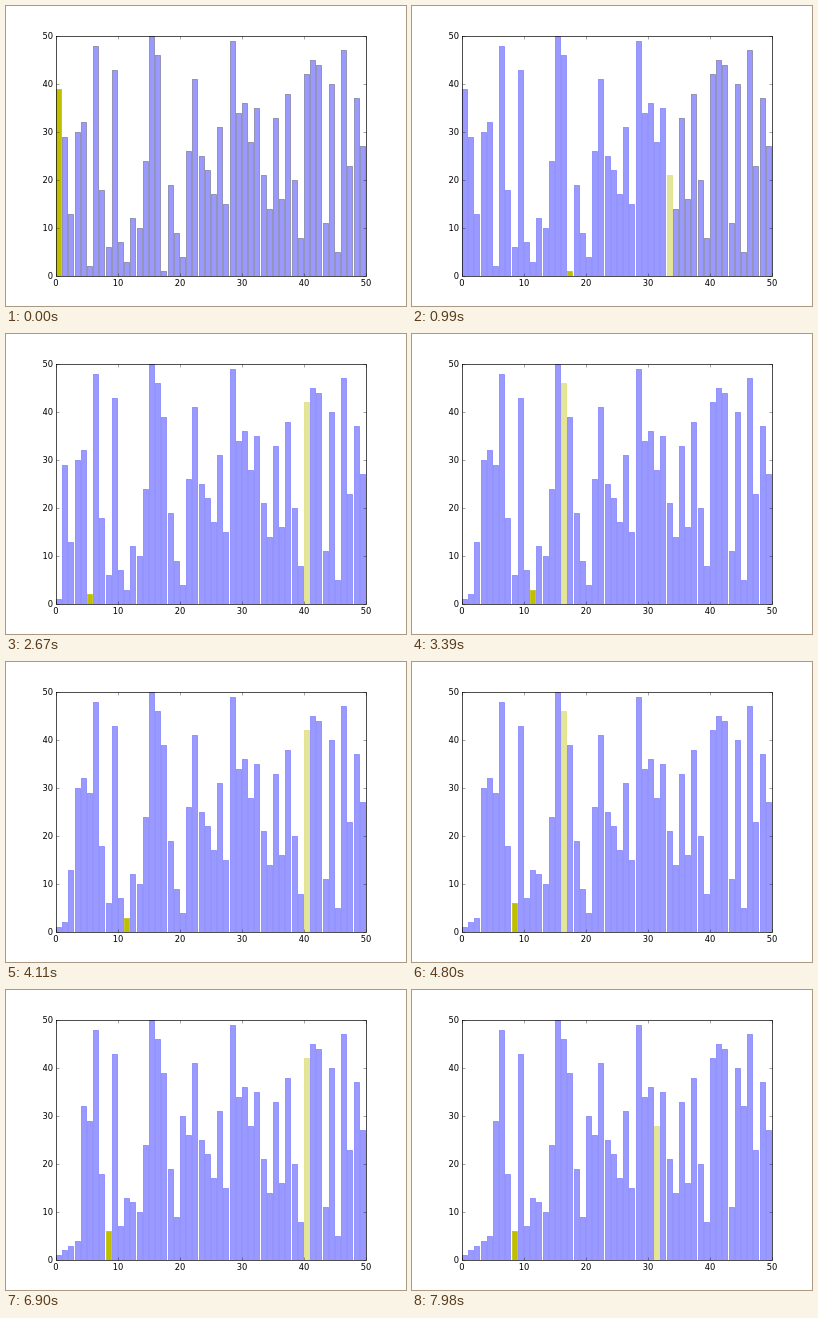
Write an HTML page that moves like this. It is 400 by 300 pixels and loops after 8000 ms.

```html
<!DOCTYPE html>
<html lang="en">
<head>
<meta charset="utf-8">
<title>Selection sort</title>
<style>
  html, body { margin: 0; width: 100%; height: 100%; overflow: hidden; background: #fff; }
  svg { display: block; width: 400px; height: 300px; }
  text { font: 8.33px "DejaVu Sans", sans-serif; fill: #000; }
  .line { stroke: #000; stroke-width: .694; fill: none; }
  .tick { stroke: #000; stroke-width: .347; }
  .bar { stroke-width: .694; }
</style>
</head>
<body>
<svg viewBox="0 0 400 300">
  <clipPath id="plot"><rect x="50" y="30" width="310" height="240"/></clipPath>
  <rect width="400" height="300" fill="#fff"/>
  <g id="bars" clip-path="url(#plot)"></g>
  <g id="axes"></g>
</svg>
<script>
const LOOP = 8000, STEP = 30;
const START = [
  39, 29, 13, 30, 32, 2, 48, 18, 6, 43, 7, 3, 12, 10, 24, 50, 46, 1, 19, 9,
  4, 26, 41, 25, 22, 17, 31, 15, 49, 34, 36, 28, 35, 21, 14, 33, 16, 38, 20, 8,
  42, 45, 44, 11, 40, 5, 47, 23, 37, 27
];
const BLUE = '#00f', YELLOW = '#bfbf00';
const LEFT = 50, TOP = 30, RIGHT = 360, BOTTOM = 270;
const xAt = v => LEFT + v * 6.2;
const yAt = v => BOTTOM - v * 4.8;
const snap = n => Math.floor(n + .5) + .5;

function add(parent, name, attrs, text) {
  const el = document.createElementNS('http://www.w3.org/2000/svg', name);
  for (const key in attrs) el.setAttribute(key, attrs[key]);
  if (text !== undefined) el.textContent = text;
  return parent.appendChild(el);
}

// One state per comparison; the swap shows when the next pass begins.
function sortStates(values, count) {
  const states = [];
  for (let pass = 0; pass < values.length; pass++) {
    let min = pass;
    for (let scan = pass; scan < values.length; scan++) {
      if (values[scan] < values[min]) min = scan;
      states.push({ values: values.slice(), pass, min, scan });
      if (states.length === count) return states;
    }
    [values[pass], values[min]] = [values[min], values[pass]];
  }
  return states;
}

function drawAxes() {
  const axes = document.getElementById('axes');
  const tick = (x, y, dx, dy) =>
    add(axes, 'line', { class: 'tick', x1: x, y1: y, x2: x + dx, y2: y + dy });
  add(axes, 'rect', {
    class: 'line', x: LEFT + .5, y: TOP + .5, width: RIGHT - LEFT, height: BOTTOM - TOP
  });
  for (let v = 0; v <= 50; v += 10) {
    const x = snap(xAt(v)), y = snap(yAt(v));
    tick(x, BOTTOM + .5, 0, -3);
    tick(x, TOP + .5, 0, 3);
    tick(LEFT + .5, y, 3, 0);
    tick(RIGHT + .5, y, -3, 0);
    add(axes, 'text', { x: xAt(v), y: 280, 'text-anchor': 'middle' }, v);
    add(axes, 'text', { x: 47, y: yAt(v) + 3, 'text-anchor': 'end' }, v);
  }
}

const states = sortStates(START.slice(), Math.ceil(LOOP / STEP));
const bars = START.map((_, i) => {
  const x = snap(xAt(i));
  return add(document.getElementById('bars'), 'rect', {
    class: 'bar', x, width: snap(xAt(i + .8)) - x
  });
});

function show({ values, pass, min, scan }) {
  bars.forEach((bar, i) => {
    const y = snap(yAt(values[i]));
    const fill = i === min || i === scan ? YELLOW : BLUE;
    const alpha = i === min ? 1 : .4;
    // Bars keep a black outline until the first pass reaches them.
    const stroke = pass === 0 && i > scan ? '#000' : fill;
    const attrs = {
      y, height: BOTTOM + .5 - y, fill, stroke, 'fill-opacity': alpha, 'stroke-opacity': alpha
    };
    for (const key in attrs) bar.setAttribute(key, attrs[key]);
  });
}

drawAxes();
const origin = performance.now();
let shown = -1;
function tickFrame() {
  const index = Math.floor((performance.now() - origin) % LOOP / STEP);
  if (index !== shown) show(states[shown = index]);
  requestAnimationFrame(tickFrame);
}
tickFrame();
</script>
</body>
</html>
```
